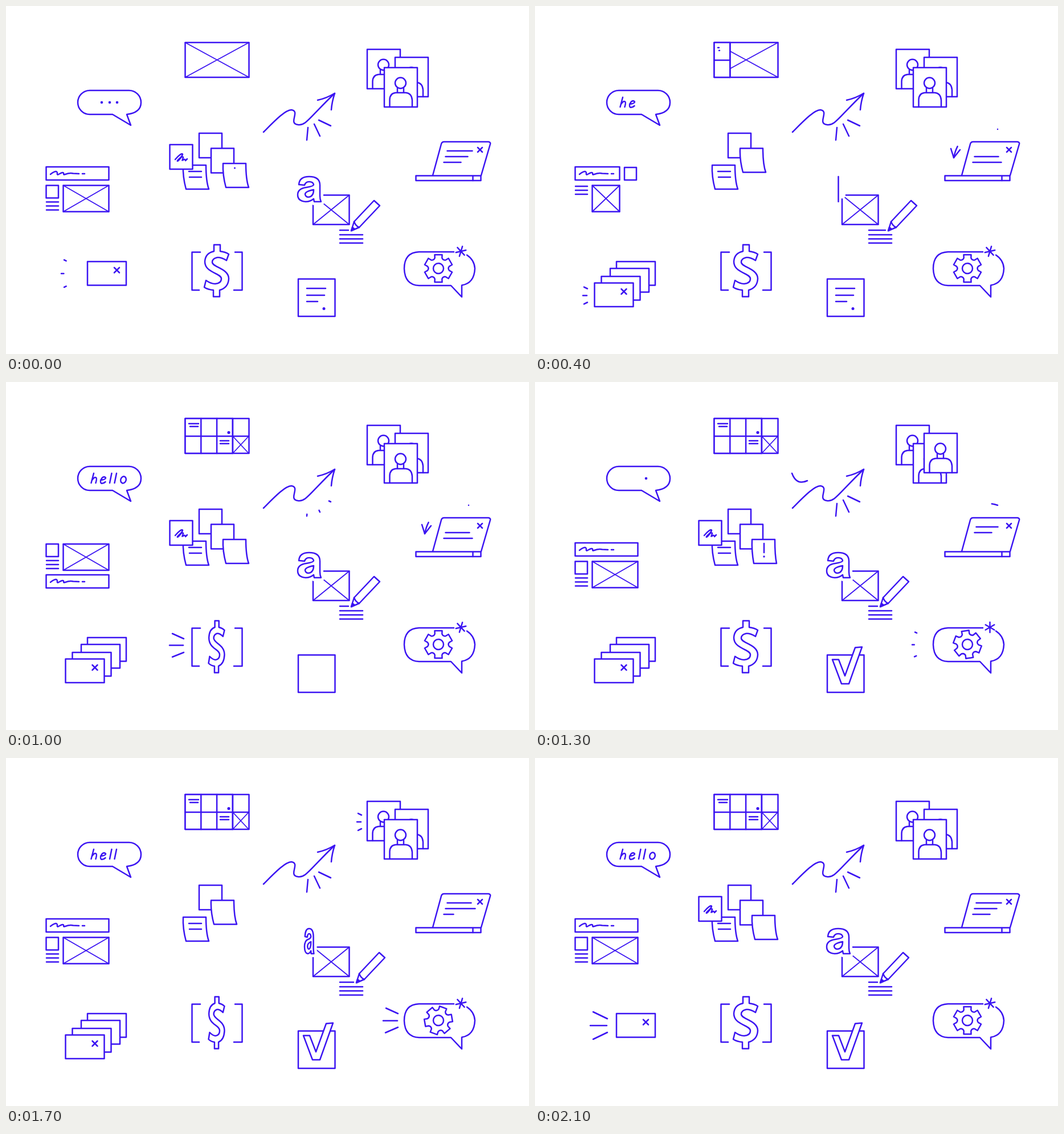
Animation of 918 by 610 pixels, one loop 2.2 s. Source, as an HTML page:

```html
<!DOCTYPE html>
<html lang="en">
<head>
<meta charset="utf-8">
<title>Doodles</title>
<style>
  html, body { margin: 0; width: 100%; height: 100%; overflow: hidden; background: #fff; }
  svg { display: block; width: 918px; height: 610px; }
  svg * { vector-effect: non-scaling-stroke; }
</style>
</head>
<body>
<svg id="stage" viewBox="0 0 918 610" fill="none" stroke="#3b14f2" stroke-width="2.5" stroke-linecap="round" stroke-linejoin="round"></svg>
<script>
const STEP = 100, STEPS = 22;
const stage = document.getElementById('stage');

// Drawing helpers, each returning markup
const path = (d, extra = '') => `<path d="${d}" ${extra}/>`;
const solid = d => path(d, 'fill="#fff"');
const line = (x1, y1, x2, y2) => path(`M${x1},${y1}L${x2},${y2}`);
const box = (x, y, w, h) => solid(`M${x},${y}h${w}v${h}h${-w}z`);
const dot = (x, y, r = 2.3) => `<circle cx="${x}" cy="${y}" r="${r}" fill="#3b14f2" stroke="none"/>`;
const ring = (x, y, r) => `<circle cx="${x}" cy="${y}" r="${r}" fill="#fff"/>`;
const group = (transform, inner) => `<g transform="${transform}">${inner}</g>`;
const cross = (x, y, r) => path(`M${x - r},${y - r}l${2 * r},${2 * r}m0,${-2 * r}l${-2 * r},${2 * r}`);
const crossBox = (x, y, w, h) => box(x, y, w, h) +
  path(`M${x},${y}l${w},${h}m0,${-h}l${-w},${h}`, 'stroke-width="1.8"');
const rules = (x, w, y, gap, n) => Array.from({ length: n }, (_, i) => line(x, y + i * gap, x + w, y + i * gap)).join('');

// Rays shoot outwards: phase 0 near stubs, 1 whole rays, 2 far stubs
function rays(list, phase) {
  const span = [[0, .24], [0, 1], [.85, 1]][phase];
  if (!span) return '';
  return list.map(([x, y, dx, dy]) =>
    line(x + dx * span[0], y + dy * span[0], x + dx * span[1], y + dy * span[1])).join('');
}
const sideRays = (x, y, phase, len = 25, rise = 12) =>
  rays([[x, y - 12, -len, -rise], [x - 1, y, -len - 4, 0], [x, y + 12, -len, rise]], phase);

function speech(s) {
  const k = s % 11;
  const letters = [
    path('M154,160L149.500,177M151,172Q155,166 158,167.500Q160,169 157.500,177'),
    path('M166,172Q175,171 175,168Q173,165 169,167.500Q164,174 167,177.500Q171,178.500 174.500,175'),
    path('M185.500,160L182,177'),
    path('M194,160L190.500,177'),
    '<ellipse cx="206" cy="171.500" rx="4.700" ry="6" transform="rotate(18 206 171.500)"/>'
  ];
  const content = k < 3
    ? [168, 182, 195].slice(k).map(x => dot(x, 169)).join('')
    : letters.slice(0, k - 2).join('');
  return path('M187,190H147a21,21 0 0 1 0,-42H216a21,21 0 0 1 21,21Q237,187 212,190L219,209Z') + content;
}

function board(s) {
  const cols = s < 3 ? 0 : s < 5 ? 1 : s < 6 ? 2 : 3;
  if (!cols) return crossBox(314.5, 64, 112, 61);
  const right = 314.5 + cols * 27.8;
  let out = cols < 3 ? crossBox(314.5, 64, 112, 61) : box(314.5, 64, 112, 61);
  out += box(314.5, 64, right - 314.5, 61);
  for (let i = 1; i <= cols; i++) out += line(314.5 + i * 27.8, 64, 314.5 + i * 27.8, 125);
  out += line(314.5, 95, s > 6 ? 426 : right, 95);
  if (s > 3) out += line(321, 73, s > 4 ? 338 : 323, 73) + line(323, 78, s > 4 ? 337 : 324, 78);
  if (s > 5) out += dot(391, 88.5, 2.6);
  if (s > 6) out += rules(376, 15, 103, 5, 2) + path('M398,95L426,125M426,95L398,125', 'stroke-width="1.8"');
  return out;
}

function portrait(x, y) {
  return group(`translate(${x} ${y})`, box(0, 0, 58, 69) +
    path('M9.500,69V56Q10,45 20,44H38Q48,45 49,57V69M23,36v7M34,36v7') + ring(28.5, 27, 9.5));
}

function people(s) {
  const cards = [[634, 76], [683, 90], [664, 108]];
  const order = s === 12 || s === 13 ? [0, 2, 1] : s === 14 || s === 15 ? [1, 2, 0] : [0, 1, 2];
  return order.map(i => portrait(...cards[i])).join('') + sideRays(624, 112, s - 17);
}

function growth(s) {
  const phase = s === 10 ? 2 : s === 11 ? -1 : s === 12 ? 0 : 1;
  let out = path('M452,221C470,203 490,182 501,182C517,184 495,206 512,208C526,211 532,196 577,153') +
    path('M547,165Q562,162 577,153Q572,168 571,182') +
    rays([[530, 213, -2, 22], [541, 207, 10, 21], [549, 200, 21, 10]], phase);
  if (s === 13 || s === 14) out += path('M451,160Q459,182 478,173');
  return out;
}

function note(x, y, curl) {
  return solid(`M${x},${y}h40q0,28 ${curl},42h-40q${-curl - 1},-22 ${-curl},-42z`);
}

function notes(s) {
  const k = s % 11, last = k < 3 || k === 10;
  let out = box(339, 223, 40, 43) + (last ? box(360, 249.5, 40, 43) : note(360, 249.5, 5));
  if (last) {
    out += note(381, 276, k === 1 || k === 2 ? 3 : 5);
    if (k === 0) out += dot(401.5, 284, 1.5);
    if (k === 1) out += line(402, 283, 402, 294);
    if (k === 2) out += line(402, 283, 402, 299) + dot(402, 306, 1.7);
  }
  out += note(311, 279, 5) + line(321, 290, 343, 290) + line(322, 300, 343, 300);
  if (k < 4 || k > 6) {
    out += box(287.5, 243, 40, 43);
    if (k === 8) out += path('M297,268Q301,261 308,258');
    else if (k !== 7) out += path('M297,269C303,262 309,257 310,260C310,264 299,271 301,272C305,270 308,262 311,265C311,269 307,272 311,270Q314,267 315,271L318,268');
  }
  return out;
}

function header(y, w) {
  return box(70.5, y, w, 23) + group(`translate(0 ${y - 282})`,
    path('M78,295C84,290 90,288 90,293C89,299 94,293 99,292C104,292 98,297 104,295Q112,292 118,293.500L128,294M134,294h4'));
}

function layout(s) {
  if (s > 0 && s < 9)
    return header(282, 78) + box(157, 283, 21, 22) + rules(71, 21, 316, 7, s - 1) + crossBox(100.5, 314.5, 48, 46);
  const low = s > 8 && s < 12, y = low ? 284 : 314.5;
  return header(low ? 338 : 282, 110) + box(70.5, y, 21.5, 22) +
    rules(71, 21, y + 29, 7, 3) + crossBox(100.5, y, 80, 46);
}

function laptop(s) {
  const k = s > 17 ? 0 : s % 6;
  // Text rows as [row, width]
  const rows = [
    [[0, 44], [1, 39], [2, 30]], [[0, 38], [1, 30]], [[0, 30]],
    [[2, 42]], [[1, 42], [2, 50]], [[0, 42], [1, 52], [2, 17]]
  ][k];
  let out = path('M749,297L764,242Q765,238 769,238H847Q851,239 850,242L834,297') +
    box(719.5, 297.5, 114, 8.5) + line(819.5, 298, 819.5, 306) + cross(832, 252, 4) +
    rows.map(([r, w]) => line(774.5 - 3 * r, 254 + 10 * r, 774.5 - 3 * r + w, 254 + 10 * r)).join('');
  const span = { 1: [0, .1], 2: [0, 1], 3: [.42, 1], 4: [.8, 1] }[k];
  if (span) out += path('M812,216C775,204 742,228 735,266',
    `pathLength="1" style="vector-effect:none" stroke-dasharray="0 ${span[0]} ${span[1] - span[0]} 2"`);
  if (k > 1 && k < 5) out += path('M730,250L735,266L746,252');
  return out;
}

function writing(s) {
  const k = s % 11;
  const scale = { 3: .4, 4: 0, 5: .2, 6: .4 }[k] ?? 1;
  const shift = { 3: 9, 4: 14, 5: 12, 6: 9, 7: 4 }[k] ?? 0;
  const outer = 'M514,313Q515,299 532,299Q551,299 551,314V333Q551,339 553,343H541L540,338Q534,343 526,343Q512,342 512,331Q512,320 527,318Q540,316 540,313Q539,308 532,308Q526,308 524,314Z';
  const counter = 'M540,322Q525,325 525,330Q526,335 531,335Q540,334 540,322Z';
  const letter = scale
    ? group(`translate(532 0) scale(${scale} 1) translate(-532 0)`,
        path(outer, 'fill="#fff" stroke="#fff" stroke-width="12"') + path(outer + counter, 'fill="#fff"'))
    : line(532.5, 299, 532.5, 343);
  return crossBox(539, 331.5, 63.5, 51.5) +
    '<circle cx="539" cy="331.500" r="6" fill="#fff" stroke="none"/>' + letter +
    line(586, 393, 601 + shift, 393) + rules(586, 40, 401, 7.3, 3) +
    group(`translate(${shift} 0)`, solid('M606,394L611,378L646,341L656,350L620,388Z') +
      path('M611,378Q614,386 620,388') + path('M606,394L608,388L612,391Z', 'fill="#3b14f2"'));
}

function folders(s) {
  const spots = [[143, 448], [132, 460], [116.5, 474], [104.5, 485.5]];
  const n = s < 5 ? Math.max(1, s) : s < 18 ? 4 : Math.max(1, 21 - s);
  const shown = spots.slice(0, n), [x, y] = shown[n - 1];
  return shown.map(([a, b]) => box(a, b, 68, 41.5)).join('') + cross(x + 51.5, y + 15, 4.5) +
    (n === 4 ? sideRays(92, 507.5, s - 4) : sideRays(127, 469, s === 0 ? 2 : s - 20));
}

function dollar(s) {
  const scale = s === 9 || s === 18 ? 0 : [8, 10, 17, 19].includes(s) ? .65 : 1;
  const sign = scale
    ? group(`translate(369.5 0) scale(${scale} 1) translate(-369.5 0)`,
        path('M365,430V418.500H376V430Q385,431 391,435L387,446Q377,440 370,441Q362,443 362,449C362,458 391,460 391,478Q390,494 375,498V509.500H364V498Q354,497 348,493L351,481Q360,487 367,487Q378,486 378,478C378,468 349,468 349,448Q350,433 365,430Z'))
    : line(369.5, 418.5, 369.5, 509.5);
  return path('M341,431.500H326.500V498H339M402,431.500H414.500V498H400') + sign +
    rays([[312, 450, -20, -9], [311, 461.5, -24, 0], [312, 474, -20, 8]], s - 9);
}

function checklist(s) {
  let out = box(513, 478.5, 64.5, 65.5);
  if (s < 10) {
    const cut = s === 8 ? 6 : s === 9 ? 18 : 0;
    [[495, 561], [507, 559], [518, 547]].forEach(([y, end]) => {
      if (528 + cut < end) out += line(528 + cut, y, end, y);
    });
    out += dot(558, 530.5, 2.5);
  }
  if (s === 11) out += path('M538,529L522,486.500H533L543,514');
  if (s > 11) out += solid('M522,486.500H533L544,515L562,465.500L574,464.500L551,529H538Z');
  return out;
}

function gearPath() {
  const at = (deg, r) => {
    const a = deg * Math.PI / 180;
    return `${(r * Math.sin(a)).toFixed(1)},${(-r * Math.cos(a)).toFixed(1)}`;
  };
  let d = '';
  for (let a = 0; a < 360; a += 60)
    d += `${a ? 'L' : 'M'}${at(a - 15, 25)}L${at(a + 15, 25)}L${at(a + 19, 19.5)}Q${at(a + 30, 16)} ${at(a + 41, 19.5)}`;
  return d + 'Z';
}
const gear = gearPath();

function settings(s) {
  const k = s > 18 ? 0 : s % 5;
  const star = [0, 60, 120].map(a => group(`rotate(${a})`, line(0, -9, 0, 9))).join('');
  return path('M786,431H725Q699,432 699,460.500Q700,489 725,490H781L800,510V489.500Q822,486 823,460Q822,445 809,436.500') +
    group(`translate(759 460) rotate(${[0, 10, 20, -9, 0][k]})`, path(gear)) + ring(759, 460, 9) +
    group(`translate(798.5 430) rotate(${k === 3 ? 0 : 17})`, star) +
    rays([[688, 448, -21, -9.5], [687, 460.5, -25, 0], [688, 472, -22, 9.5]], k - 1);
}

const doodles = [speech, board, people, growth, notes, layout, laptop, writing, folders, dollar, checklist, settings];
const start = performance.now();
let shownStep = -1;

function render(now) {
  const step = Math.floor(Math.max(0, now - start) / STEP) % STEPS;
  if (step !== shownStep) {
    stage.innerHTML = doodles.map(draw => draw(step)).join('');
    shownStep = step;
  }
  requestAnimationFrame(render);
}
render(start);
</script>
</body>
</html>
```
